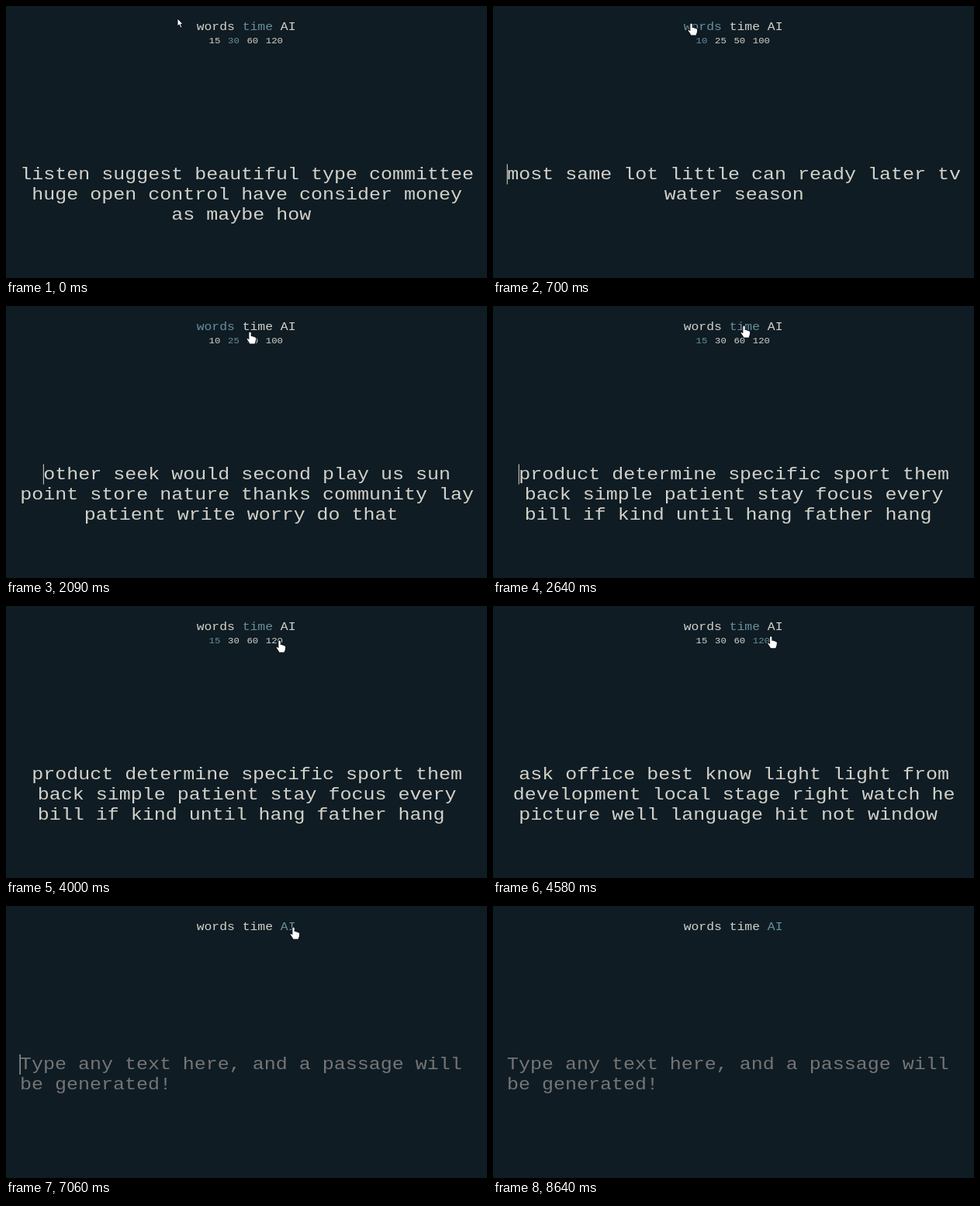
Animation, 620 px wide and 350 px high, one loop 9 s. Source, as an HTML page:

```html
<!DOCTYPE html>
<html lang="en">
<head>
<meta charset="utf-8">
<title>Typing test</title>
<style>
  html, body { margin: 0; width: 100%; height: 100%; overflow: hidden; background: #0f1c24; }
  svg { display: block; width: 620px; height: 350px; background: #0f1c24; }
  text { font-family: "Liberation Mono", monospace; white-space: pre; fill: #d3d1c8; }
  .mode { font-size: 16.4px; }
  .option { font-size: 12.3px; }
  .line { font-size: 25px; }
  .active { fill: #688f9b; }
  .hint { fill: #757575; }
</style>
</head>
<body>
<svg id="stage" viewBox="0 0 620 350" xmlns="http://www.w3.org/2000/svg">
  <g id="cursor" stroke="#0b1218" stroke-width="1" stroke-linejoin="round" fill="#fff">
    <path id="arrow" d="M0 0V10L2.3 8L4 12L5.8 11.2L4.2 7.4H7Z"/>
    <path id="hand" transform="translate(.6 0) scale(1.1)" d="M-1.6 1Q0 -1 1.5 1V5Q3 4.4 3.8 5.6Q5.2 5 5.8 6.4Q7.6 6.2 7.4 8.4Q7.4 11.4 5.8 14.6H-.6Q-2 11.8 -4 9.2Q-4.4 7.2 -2.6 7.6L-1.6 8.6Z"/>
  </g>
</svg>
<script>
const LOOP = 9000;
const CENTER = 310.8;
const CHAR = 15;
const FLATTEN = 0.86; // low, wide typewriter proportions

// Each scene starts at a click; carets are [on, off] spans.
const scenes = [
  { at: 0, mode: 1, options: [15, 30, 60, 120], picked: 1, carets: [],
    lines: ["listen suggest beautiful type committee", "huge open control have consider money", "as maybe how "] },
  { at: 670, mode: 0, options: [10, 25, 50, 100], picked: 0, carets: [[670, 1200]],
    lines: ["most same lot little can ready later tv", "water season"] },
  { at: 1670, mode: 0, options: [10, 25, 50, 100], picked: 1, carets: [[1670, 2200]],
    lines: ["other seek would second play us sun", "point store nature thanks community lay", "patient write worry do that "] },
  { at: 2640, mode: 1, options: [15, 30, 60, 120], picked: 0, carets: [[2640, 3170]],
    lines: ["product determine specific sport them", "back simple patient stay focus every", "bill if kind until hang father hang "] },
  { at: 4090, mode: 1, options: [15, 30, 60, 120], picked: 3, carets: [[4090, 4380], [4910, 5440], [5970, 6330]],
    lines: ["ask office best know light light from", "development local stage right watch he", "picture well language hit not window "] },
  { at: 6330, mode: 2, options: [], picked: -1, carets: [[6330, 6520], [7060, 7580], [8120, 8640]], hint: true,
    lines: ["Type any text here, and a passage will", "be generated!"] }
];

// Pointer tip: time, x, y
const path = [
  [0, 221, 16], [30, 221, 16], [480, 255, 22], [940, 255, 22], [1480, 293, 40],
  [1670, 293, 40], [2090, 314, 33], [2330, 323, 25], [2640, 323, 25],
  [3520, 350, 43], [4000, 352, 44], [4330, 352, 44], [5000, 370, 27], [LOOP, 370, 27]
];
const HAND_FROM = 300;
const POINTER_GONE = 8180;

const stage = document.getElementById("stage");
const cursor = document.getElementById("cursor");
const arrow = document.getElementById("arrow");
const hand = document.getElementById("hand");

function add(name, attrs, parent) {
  const node = document.createElementNS("http://www.w3.org/2000/svg", name);
  for (const key in attrs) node.setAttribute(key, attrs[key]);
  parent.appendChild(node);
  return node;
}

function label(parent, text, x, y, style) {
  const transform = `translate(${x} ${y}) scale(1 ${FLATTEN})`;
  add("text", { transform, class: style }, parent).textContent = text;
}

function build(scene) {
  const group = add("g", {}, stage);
  ["words", "time", "AI"].forEach((word, i) =>
    label(group, word, [245.7, 304.7, 353.8][i], 30.7, "mode" + (i === scene.mode ? " active" : "")));
  scene.options.forEach((value, i) =>
    label(group, value, 261.6 + i * 24.4, 48, "option" + (i === scene.picked ? " active" : "")));

  const left = line => scene.hint ? 18 : CENTER - line.length * CHAR / 2;
  const base = scene.hint ? 210.2 : 222.6;
  scene.lines.forEach((line, i) =>
    label(group, line, left(line), base + i * 26.2, "line" + (scene.hint ? " hint" : "")));

  scene.group = group;
  scene.caret = add("rect", {
    x: left(scene.lines[0]) - 0.5, y: scene.hint ? 191 : 203.5,
    width: 1.2, height: 26, fill: "#b9b8b0"
  }, group);
}

function show(node, visible) {
  node.setAttribute("visibility", visible ? "inherit" : "hidden");
}

function pointerAt(t) {
  const i = Math.max(1, path.findIndex(p => p[0] > t));
  const [t0, x0, y0] = path[i - 1];
  const [t1, x1, y1] = path[i];
  const k = (t - t0) / (t1 - t0);
  const e = k * k * (3 - 2 * k);
  return [x0 + (x1 - x0) * e, y0 + (y1 - y0) * e];
}

function draw(t) {
  const current = scenes.filter(s => s.at <= t).pop();
  for (const scene of scenes) show(scene.group, scene === current);
  show(current.caret, current.carets.some(([on, off]) => t >= on && t < off));

  cursor.setAttribute("transform", `translate(${pointerAt(t)})`);
  show(cursor, t < POINTER_GONE);
  show(arrow, t < HAND_FROM);
  show(hand, t >= HAND_FROM);
}

scenes.forEach(build);
stage.appendChild(cursor);

const start = performance.now();
function tick() {
  draw((performance.now() - start) % LOOP);
  requestAnimationFrame(tick);
}
draw(0);
requestAnimationFrame(tick);
</script>
</body>
</html>
```
